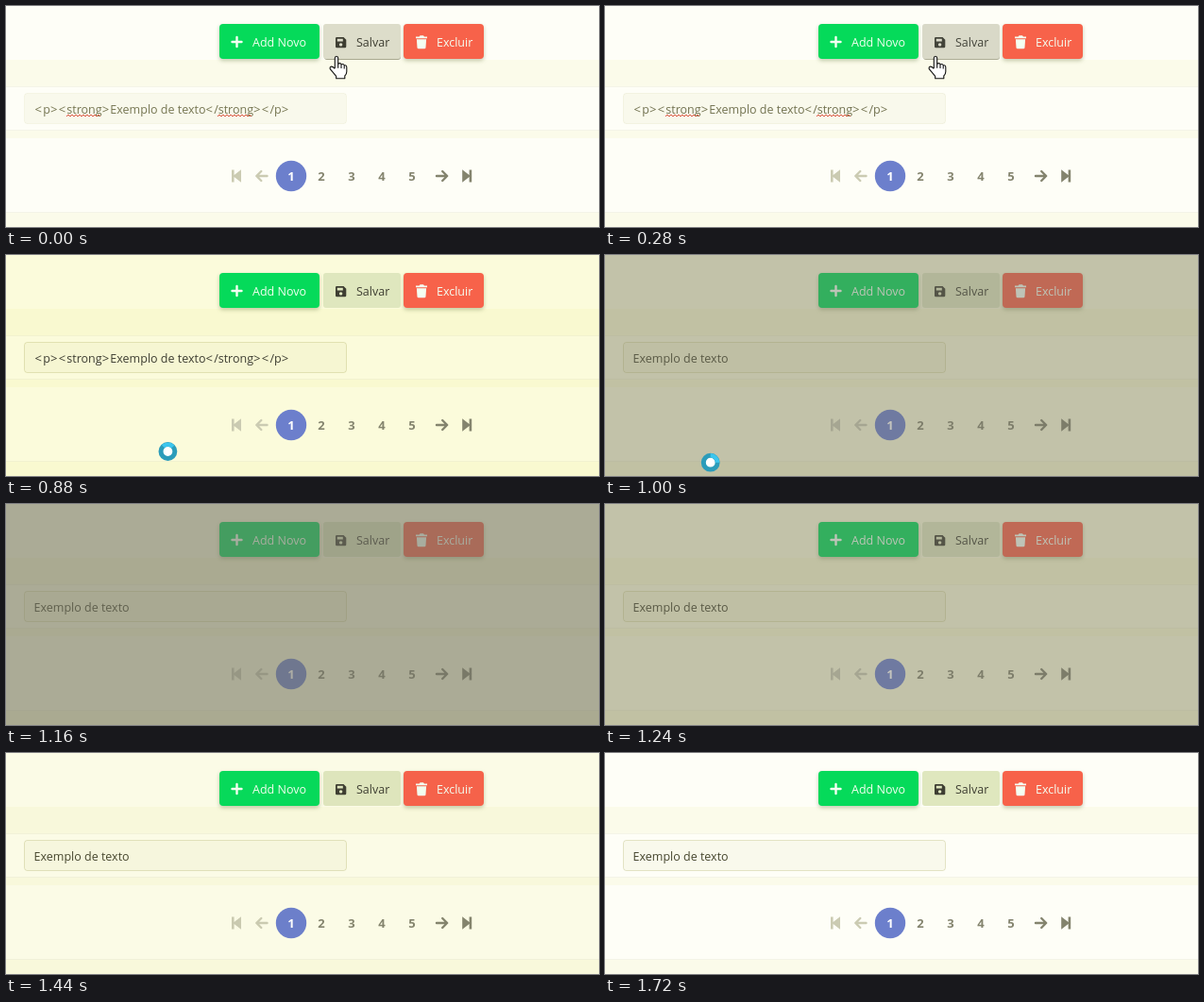
Write an HTML page that moves like this. It is 628 by 234 pixels and loops after 1800 ms.

```html
<!DOCTYPE html>
<html lang="pt">
<head>
<meta charset="utf-8">
<title>Salvar</title>
<style>
html, body { margin: 0; width: 100%; height: 100%; overflow: hidden; background: #fefef7; }
svg { display: block; width: 628px; height: 234px; font: 12.5px "Open Sans", "Noto Sans", sans-serif; }
.btn { filter: drop-shadow(0 2px 2px rgba(90, 110, 50, .35)); }
.on { fill: #f4fff2; }
.sign { font-size: 13px; letter-spacing: 1.25px; }
.num { font-size: 13px; font-weight: 700; text-anchor: middle; fill: #84846e; }
.line { fill: none; stroke-width: 2.4; stroke-linecap: round; stroke-linejoin: round; }
.cursor { fill: #fff; stroke: #111; stroke-width: 1.1; stroke-linejoin: round; }
</style>
</head>
<body>
<svg viewBox="0 0 628 234">
  <rect width="628" height="234" fill="#fefef7"/>
  <g fill="#fbfbea">
    <rect y="57" width="628" height="28"/>
    <rect y="132" width="628" height="8"/>
    <rect y="219" width="628" height="15"/>
  </g>
  <rect id="tint" width="628" height="234" fill="#ebeb5a"/>
  <path d="M0 85.5H628M0 131.5H628M0 218.5H628" stroke="#a0a060" stroke-opacity=".1"/>

  <g class="btn">
    <rect x="226" y="19" width="106" height="37" rx="4" fill="#05da5a"/>
    <rect x="421" y="19" width="85" height="37" rx="4" fill="#f7624a"/>
  </g>
  <path class="line" d="M239.5 38h10M244.5 33v10" stroke="#f4fff2"/>
  <text class="on" x="261" y="43">Add Novo</text>
  <path class="on" d="M434 32.5h3.6l1-1.3h3.4l1 1.3h3v1.8h-12zM434.9 35.3h10.2l-.6 8.6q-.1 1.3-1.4 1.3h-6.2q-1.3 0-1.4-1.3z"/>
  <text class="on" x="456" y="43">Excluir</text>

  <rect id="lift" x="337" y="21" width="81" height="36" rx="3" fill="#a8a890"/>
  <rect id="save" x="336" y="19" width="82" height="37" rx="3"/>
  <g id="label">
    <path fill-rule="evenodd" d="M350.3 33h7.2l2.8 2.8v7.2q0 1.3-1.3 1.3h-8.7q-1.3 0-1.3-1.3v-8.7q0-1.3 1.3-1.3zM350.8 34.7v2.8h6v-2.8zM354.6 39.2a1.7 1.7 0 1 0 .01 0z"/>
    <text x="371" y="43">Salvar</text>
  </g>

  <rect id="field" x="19.5" y="92.5" width="341" height="32" rx="3" fill="#c8c878" fill-opacity=".09" stroke="#a0a050"/>
  <text id="markup" x="30.6" y="114"><tspan class="sign">&lt;</tspan>p<tspan class="sign">&gt;&lt;</tspan>strong<tspan class="sign">&gt;</tspan>Exemplo de texto<tspan class="sign">&lt;</tspan>/strong<tspan class="sign">&gt;&lt;</tspan>/p<tspan class="sign">&gt;</tspan></text>
  <text id="plain" x="29.5" y="114" fill="#46462e">Exemplo de texto</text>
  <path id="spell" fill="none" stroke="#d8553c"/>

  <circle cx="302" cy="180" r="16.2" fill="#6c7fcc"/>
  <g id="pages"></g>
  <g fill="#cbcbb2" stroke="#cbcbb2">
    <path stroke="none" d="M239 173.5h2.6v5.6l7.4-5.8v13.4l-7.4-5.8v5.6H239z"/>
    <path class="line" d="M276.5 180h-11M270.3 175l-5 5 5 5"/>
  </g>
  <g fill="#84846e" stroke="#84846e">
    <path class="line" d="M456 180h11M462.2 175l5 5-5 5"/>
    <path stroke="none" d="M493.2 173.5h-2.6v5.6l-7.4-5.8v13.4l7.4-5.8v5.6h2.6z"/>
  </g>

  <rect id="veil" width="628" height="234" fill="#737364"/>

  <path id="hand" class="cursor" d="M-1.7 12V1.2Q-1.7-.8 0-.8T1.7 1.2V7.2Q4.8 5.8 5 8Q8 6.8 8.2 9Q10.8 8.2 10.8 11V15.5Q10.8 18 8.8 20V22.8H-.3V20.3Q-3.6 16.5-6.4 13.2Q-7.6 11.2-6 10.3Q-4.5 9.6-1.7 12.4M1.7 7.2v4.6M5 8v4M8.2 9v3.4"/>
  <path id="arrow" class="cursor" d="M0 0V16.5L3.8 13L6.5 19L9 17.9L6.4 12H11.5Z"/>
  <g id="busy">
    <circle r="7.4" fill="#fff" stroke="#2b9cba" stroke-width="5"/>
    <path id="sweep" d="M0-7.4A7.4 7.4 0 0 1 7.4 0" fill="none" stroke="#3cc6ee" stroke-width="4.4"/>
  </g>
</svg>
<script>
const LOOP = 1800, STEP = 40;
const LEAVE = 320, BUSY = 720, REPLY = 880, SHOWN = 1080, CLEAR = 1480;

const $ = id => document.getElementById(id);
const set = (id, name, value) => $(id).setAttribute(name, value);
const show = (id, on) => $(id).style.display = on ? "" : "none";

// Eased progress from 0 to 1 between two times.
function ease(t, from, to) {
  const p = Math.min(1, Math.max(0, (t - from) / (to - from)));
  return (1 - Math.cos(Math.PI * p)) / 2;
}

const mix = (a, b, k) => a.map((v, i) => v + (b[i] - v) * k);
const rgb = c => `rgb(${c.map(Math.round)})`;

// Point on a Bézier curve, by repeated halving of its control points.
function bezier(points, k) {
  while (points.length > 1) points = points.slice(1).map((p, i) => mix(points[i], p, k));
  return points[0];
}

const path = [[350, 54], [391, 78], [178, 250], [85, 215]];
const rest = [223, 231, 190], hover = [221, 221, 202], pressed = [154, 165, 174];
const ink = [62, 62, 50], faded = [138, 150, 162], pale = [118, 118, 82];

const wave = x => `M${x} 117` + "l2-2 2 2".repeat(9);
set("spell", "d", wave(64) + wave(224));

$("pages").innerHTML = [1, 2, 3, 4, 5].map(n =>
  `<text class="num" x="${270 + 32 * n}" y="185"${n === 1 ? ' style="fill:#fff"' : ""}>${n}</text>`).join("");

function draw(now) {
  let t = Math.floor((now % LOOP) / STEP) * STEP;
  if (t < 2 * STEP) t = 0;

  const down = ease(t, LEAVE - 80, LEAVE + 160);
  const press = down - ease(t, 600, 800);
  const away = t < 600 ? 0 : 1;
  set("save", "fill", rgb(mix(away ? rest : hover, pressed, press)));
  set("label", "fill", rgb(mix(ink, faded, press)));
  set("lift", "opacity", 1 - down);

  set("markup", "fill", rgb(mix(pale, ink, down)));
  set("field", "stroke-opacity", .08 + .2 * down);
  show("spell", down < .5);
  show("markup", t < REPLY + STEP);
  show("plain", t >= REPLY + STEP);

  set("tint", "opacity", .18 * (ease(t, BUSY, REPLY) - ease(t, 1320, 1560)));
  set("veil", "opacity", .64 * (ease(t, REPLY, SHOWN) - ease(t, SHOWN, CLEAR)));

  const spot = bezier(path, ease(t, LEAVE, 1160));
  const kind = spot[1] < 56 ? "hand" : t < BUSY ? "arrow" : "busy";
  for (const id of ["hand", "arrow", "busy"]) show(id, id === kind && t <= SHOWN);
  set(kind, "transform", `translate(${spot})`);
  set("sweep", "transform", `rotate(${t * .36})`);
}

const start = performance.now();
function loop() {
  draw(performance.now() - start);
  requestAnimationFrame(loop);
}
loop();
</script>
</body>
</html>
```
